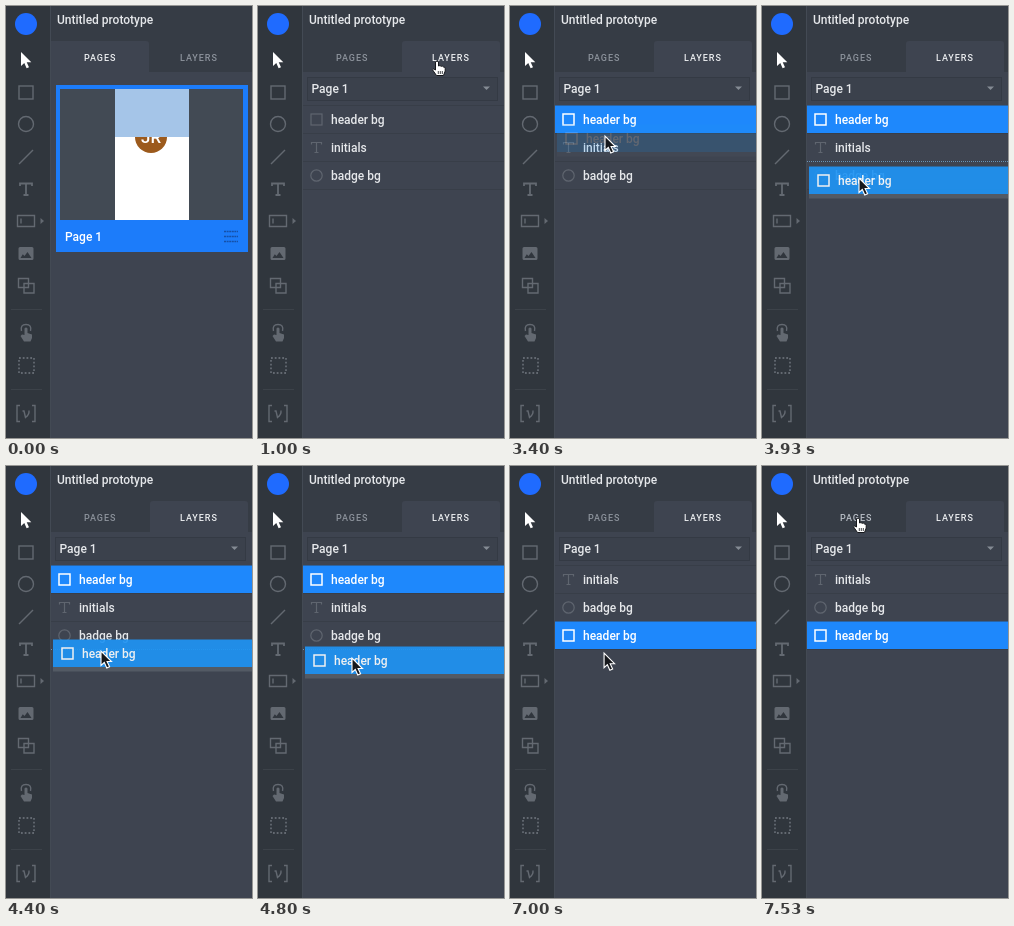
An HTML page for the animation above (8000 ms loop, 246 by 432 pixels).

```html
<!DOCTYPE html>
<html lang="en">
<head>
<meta charset="utf-8">
<title>Layer order</title>
<style>
  html, body { margin: 0; width: 100%; height: 100%; overflow: hidden; background: #3e4450; }
  svg { display: block; width: 246px; height: 432px; }
  text { font: 500 12px Roboto, sans-serif; fill: #e6e8eb; }
  .strong { fill: #fff; }
  .tab { font-size: 9px; letter-spacing: 1px; }
  .icon { fill: none; stroke: #636971; stroke-width: 1.4; }
  .solid { fill: #636971; stroke: none; }
  .mark { fill: none; stroke: #5f656f; stroke-width: 1.2; }
  .bright { stroke: #fff; stroke-width: 1.5; }
  .rule { stroke: #383e48; }
</style>
</head>
<body>
<svg viewBox="0 0 246 432">
  <defs>
    <clipPath id="below"><rect x="109" y="131" width="74" height="83"/></clipPath>
  </defs>

  <rect width="246" height="432" fill="#3e4450"/>
  <rect x="44" width="202" height="66" fill="#363c45"/>
  <path id="tabBg" fill="#3e4450"/>
  <text x="51" y="18">Untitled prototype</text>
  <text id="pagesTab" class="tab" x="78" y="54.500">PAGES</text>
  <text id="layersTab" class="tab" x="174" y="54.500">LAYERS</text>

  <!-- toolbar -->
  <rect width="44" height="432" fill="#30363d"/>
  <path d="M44.500 0V432" stroke="#434a54"/>
  <circle cx="20" cy="18" r="11" fill="#1f6bff"/>
  <path d="M15 46V60L18.300 57L20.600 62.300L23 61.200L20.700 56.200H25.300Z" fill="#fff"/>
  <g class="icon">
    <rect x="13" y="80" width="14" height="13"/>
    <circle cx="20" cy="118" r="7.500"/>
    <path d="M13 158L27 144"/>
    <path d="M14 180V177.500H26V180M20 177.500V189M17.500 189H22.500" stroke-width="1.800"/>
    <path d="M11.500 209.500H28.500V220.500H11.500ZM15 212.500V217.500"/>
    <path class="solid" d="M34.500 212L38 215L34.500 218Z"/>
    <path class="solid" fill-rule="evenodd" d="M14 241H26Q27.500 241 27.500 242.500V252.500Q27.500 254 26 254H14Q12.500 254 12.500 252.500V242.500Q12.500 241 14 241ZM14.500 252H25.500L21.500 246L18.500 250L16.800 248.300Z"/>
    <path d="M18 281.500H12.500V272.500H22.500V277M18 277.500H28V287H18ZM18 281.500H22.500V277"/>
    <path class="solid" d="M18.500 329V322.500Q20 320.500 21.500 322.500V327L26 328.500V332L24.500 335.500H18L14.500 330L16 328.500Z"/>
    <path d="M15.500 325Q14 318.500 20 318.500Q26 318.500 24.500 325"/>
    <rect x="13" y="352" width="15" height="15" stroke-width="1.800" stroke-dasharray="1.800 1.950"/>
    <path d="M14 399.500H11V415.500H14M26 399.500H29V415.500H26M16.500 405H18L19.500 411.500Q23.500 408.500 23 404.500"/>
  </g>
  <path d="M5 303.500H36M5 383.500H36" stroke="#3c4249"/>

  <g id="pages">
    <rect x="50" y="79" width="192" height="167" fill="#1c7cfa"/>
    <rect x="54" y="83" width="183" height="131" fill="#424a54"/>
    <rect x="109" y="83" width="74" height="131" fill="#fff"/>
    <g clip-path="url(#below)">
      <circle cx="145" cy="131" r="16" fill="#9c5a1c"/>
      <text x="145" y="136.500" class="strong" text-anchor="middle" style="font-size:17px">JR</text>
    </g>
    <rect x="109" y="83" width="74" height="48" fill="#a5c5e8"/>
    <text x="59" y="234.500" class="strong">Page 1</text>
    <path d="M218 225.500H232M218 230.500H232M218 235.500H232" stroke="#1550a8" stroke-width="1.500" stroke-dasharray="2 .6"/>
  </g>

  <g id="layers">
    <rect x="49.500" y="71.500" width="190" height="23" fill="#3b414c" stroke="#343a44"/>
    <text x="53.500" y="86.500">Page 1</text>
    <path d="M225 80.500H232L228.500 84Z" fill="#858b94"/>
    <path class="rule" d="M45 99.500H246M45 127.500H246M45 155.500H246M45 183.500H246"/>
    <g id="initials">
      <path class="mark" d="M53.500 -3V-5H63.500V-3M58.500 -5V5M56.500 5H60.500"/>
      <text x="73" y="4">initials</text>
    </g>
    <g id="badge">
      <circle class="mark" cx="58.500" cy="0" r="5.700"/>
      <text x="73" y="4">badge bg</text>
    </g>
    <g id="header">
      <rect id="selected" x="45" y="-14" width="201" height="27.500" fill="#1e88fc"/>
      <rect id="headerMark" x="53" y="-5.500" width="11" height="11"/>
      <text id="headerText" x="73" y="4">header bg</text>
    </g>
    <path id="dropLine" d="M45 0H246" stroke="#6a94b6" stroke-dasharray="1 1"/>
    <g id="ghost">
      <rect x="44" y="13" width="202" height="5" fill="#555c66"/>
      <rect x="44" y="-14" width="202" height="27.500" fill="#1f94f4"/>
      <rect class="mark bright" x="53" y="-5.500" width="11" height="11"/>
      <text x="73" y="4" class="strong">header bg</text>
    </g>
  </g>

  <g id="cursor">
    <path id="arrow" d="M0 0V14.500L3.300 11.500L5.800 17L8.600 15.700L6.100 10.500H10.500Z" fill="#16181c" stroke="#fff" stroke-width="1.100"/>
    <g id="hand">
      <path d="M-1.500 1Q0 -1 1.500 1V5Q3 4 4.200 5.300Q5.600 4.700 6.500 6Q8 5.700 8.200 7.500V10L6.500 14.500H-.5L-4.500 8.800Q-3.500 7 -1.500 9Z" fill="#fff" stroke="#15171b" stroke-width="1"/>
      <path d="M1.300 10V13M3.300 10V13M5.300 10V13" stroke="#15171b" stroke-width=".8"/>
    </g>
  </g>
</svg>
<script>
const el = id => document.getElementById(id);
const LOOP = 8000, FPS = 15;

// Steps at 15 per second
const SWITCH = 15, SELECT = 47, DRAG = 50, RELEASE = 72, GONE = 75, DROP = 79;

const smooth = u => u * u * (3 - 2 * u);
const out = u => 1 - (1 - u) ** 2;
const linear = u => u;

// [step, x, y, easing into this point]
const path = [
  [3, 232, 65], [9, 179, 55, out], [33, 179, 55], [34, 172.5, 55.5],
  [42, 95, 111, smooth], [49, 94, 111], [51, 95, 130], [55, 97, 155],
  [59, 97, 172], [62, 96, 179], [66, 95, 185], [72, 94, 192, out],
  [104, 94, 192], [113, 96, 52, smooth]
];

function cursorAt(k) {
  const i = path.findIndex(p => p[0] > k);
  if (i < 0) return path[path.length - 1].slice(1, 3);
  if (i === 0) return path[0].slice(1, 3);
  const [k0, x0, y0] = path[i - 1], [k1, x1, y1, ease = linear] = path[i];
  const u = ease((k - k0) / (k1 - k0));
  return [x0 + (x1 - x0) * u, y0 + (y1 - y0) * u];
}

const clamp = v => Math.max(0, Math.min(1, v));
const show = (id, on) => el(id).style.display = on ? "" : "none";
const move = (id, x, y) => el(id).setAttribute("transform", `translate(${x} ${y})`);
const toRow = (id, row) => move(id, 0, 113.5 + 28 * row);
const tabColor = (active, hover) => active ? "#eef0f2" : hover ? "#b9bec6" : "#8d939c";

function draw(k) {
  const [x, y] = cursorAt(k);
  const onLayers = k >= SWITCH, selected = k >= SELECT, dropped = k >= DROP;
  const hover = k >= 3 && y < 66;

  show("pages", !onLayers);
  show("layers", onLayers);
  el("tabBg").setAttribute("d", onLayers
    ? "M144 66V38Q144 35 147 35H239Q242 35 242 38V66Z"
    : "M45 66V35H140Q143 35 143 38V66Z");
  el("pagesTab").style.fill = tabColor(!onLayers, hover && x < 144);
  el("layersTab").style.fill = tabColor(onLayers, hover && x >= 144);

  toRow("header", dropped ? 2 : 0);
  toRow("initials", dropped ? 0 : 1);
  toRow("badge", dropped ? 1 : 2);
  show("selected", selected);
  el("headerMark").setAttribute("class", selected ? "mark bright" : "mark");
  el("headerText").setAttribute("class", selected ? "strong" : "");

  const fadeIn = clamp((k - DRAG + 1) / 10);
  const fadeOut = clamp((GONE - k) / (GONE - RELEASE));
  const dragging = k >= DRAG && k < GONE;
  show("ghost", dragging);
  el("ghost").style.opacity = Math.min(fadeIn, fadeOut) * .92;
  move("ghost", 3, y + 2.5);
  show("dropLine", dragging && k >= 53);
  move("dropLine", 0, k < 63 ? 155.5 : 183.5);

  const hand = y < 96;
  show("cursor", k >= 3);
  show("hand", hand);
  show("arrow", !hand);
  move("cursor", x, y);
}

const start = performance.now();
function tick() {
  const t = (performance.now() - start) % LOOP;
  draw(Math.floor((t + 3.5) * FPS / 1000) % (LOOP * FPS / 1000));
  requestAnimationFrame(tick);
}
tick();
</script>
</body>
</html>
```
